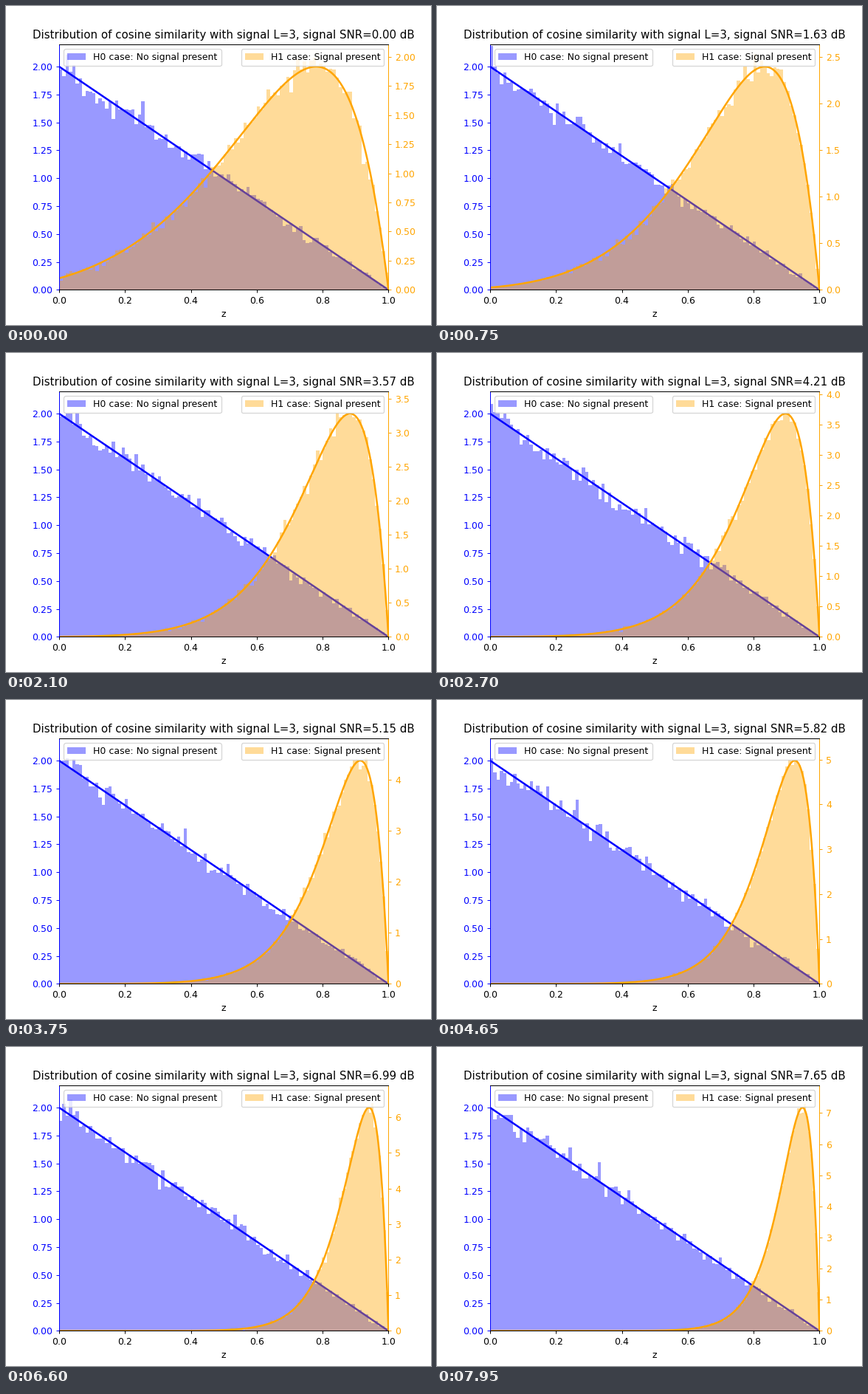
Write a matplotlib script that moves like this. It is 576 by 432 pixels and loops after 8 s.

```python
import numpy as np
import matplotlib.pyplot as plt
from matplotlib.animation import FuncAnimation

L = 3
SAMPLES = 50000
BINS = 100
FRAMES, INTERVAL, HOLD = 160, 50, 3  # each picture stays for HOLD frames

z = np.linspace(0, 1, 500)


def snr_at(step):
    return 1 + step / 11


def h1_pdf(mu):
    """Noncentral beta(1, 2) density."""
    y = mu * z
    return (1 - z) * np.exp(-mu * (1 - z)) * (y * y + 4 * y + 2)


def draw_samples(step):
    rng = np.random.default_rng(step)
    h0 = 1 - np.sqrt(1 - rng.random(SAMPLES))
    h1 = rng.beta(1 + rng.poisson(L * snr_at(step), SAMPLES), 2)
    return h0, h1


def add_case(ax, color, label, side):
    hist = ax.stairs(np.zeros(BINS), np.linspace(0, 1, BINS + 1), fill=True,
                     color=color, alpha=0.4, label=label)
    line, = ax.plot(z, 2 * (1 - z), color=color, lw=2)
    ax.tick_params(axis="y", colors=color)
    ax.legend(loc="upper " + side)
    return hist, line


plt.rcParams["font.family"] = "DejaVu Sans"
fig, ax0 = plt.subplots(figsize=(6.4, 4.8), dpi=90)
ax1 = ax0.twinx()
hist0, _ = add_case(ax0, "blue", "H0 case: No signal present", "left")
hist1, line1 = add_case(ax1, "orange", "H1 case: Signal present", "right")
for ax in (ax0, ax1):
    ax.spines["left"].set_color("blue")
    ax.spines["right"].set_color("orange")
ax0.set(xlim=(0, 1), ylim=(0, 2.2), xlabel="z")
title = ax0.set_title("")


def update(frame):
    step = frame // HOLD
    for hist, data in zip((hist0, hist1), draw_samples(step)):
        hist.set_data(*np.histogram(data, BINS, density=True))
    snr = snr_at(step)
    pdf = h1_pdf(L * snr)
    line1.set_ydata(pdf)
    ax1.set_ylim(0, 1.1 * pdf.max())
    title.set_text(f"Distribution of cosine similarity with signal L={L}, "
                   f"signal SNR={10 * np.log10(snr):.2f} dB")
    return hist0, hist1, line1, title


anim = FuncAnimation(fig, update, frames=FRAMES, interval=INTERVAL,
                     repeat=True, repeat_delay=0, blit=False)
plt.show()
```
